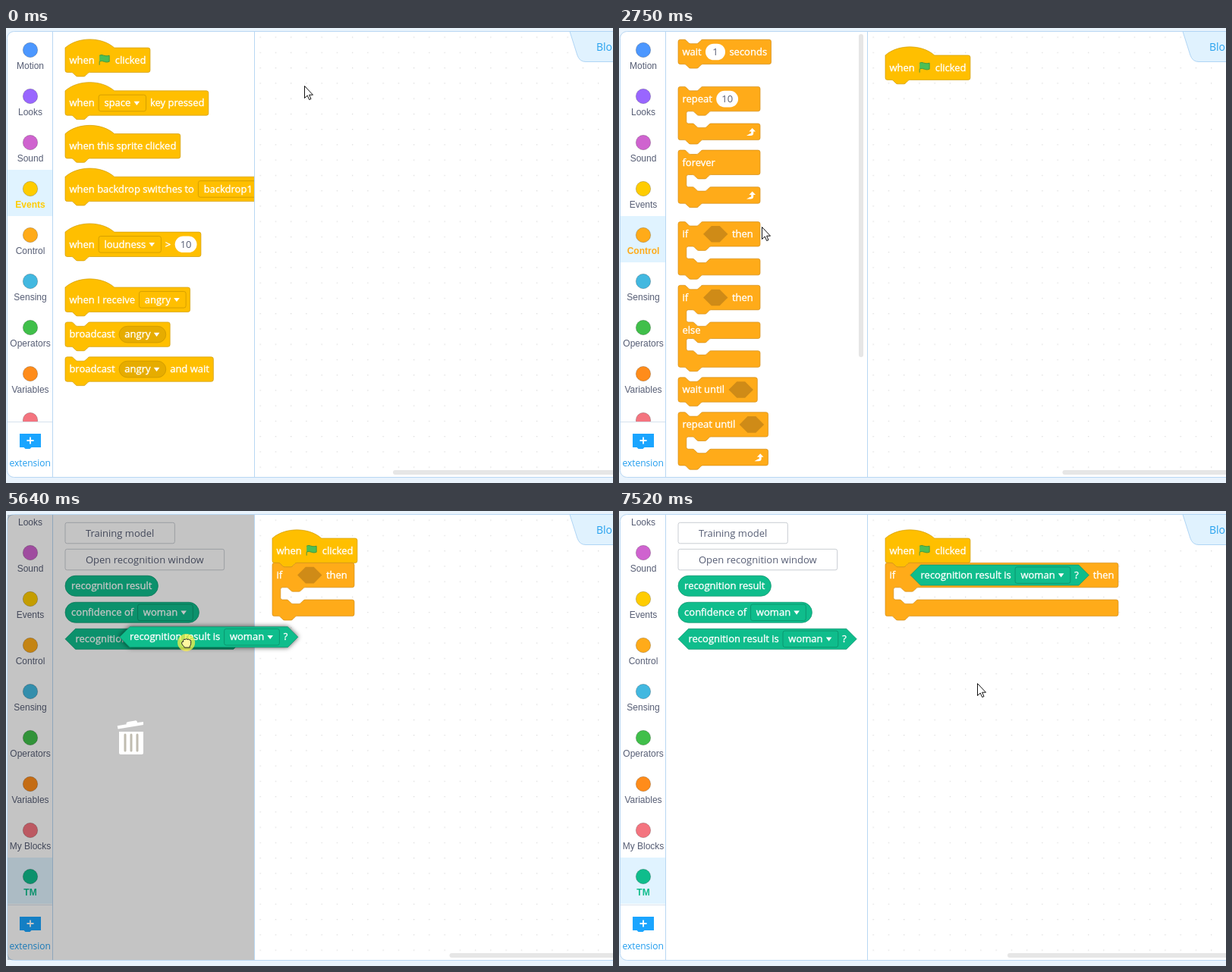
These frames come from a looping animation (800x600 px, 7.9 s). An HTML page:

```html
<!DOCTYPE html>
<html lang="en">
<head>
<meta charset="utf-8">
<title>Block editor</title>
<style>
  html, body { margin: 0; width: 100%; height: 100%; overflow: hidden; background: #e9f3fc; }
  svg { display: block; width: 100%; height: 100%; }
  text { font: 13px "Open Sans", "Noto Sans", sans-serif; white-space: pre; }
  .cap { fill: #fff; stroke: #fff; stroke-width: .35; }
  .ink { fill: #575e75; text-anchor: middle; }
  .cat { font: 12px "Liberation Sans", Arial, sans-serif; }
  .on { font-weight: bold; }
  .drag { filter: drop-shadow(0 0 3px rgba(0, 0, 0, .65)); }
</style>
</head>
<body>
<svg id="stage" viewBox="0 0 800 600"></svg>
<script>
const LOOP = 7900;
const SCALE = .675; // block units to pixels
const px = units => units * SCALE;
const GAP = px(8);

const events = { fill: '#ffbf00', line: '#cc9900', dark: '#e6ac00' };
const control = { fill: '#ffab19', line: '#cf8b17', dark: '#cf8b17' };
const tm = { fill: '#0fbd8c', line: '#0b8e69', dark: '#0da57a' };

// ---- block outlines, in block units ----
const notch = 'c2,0 3,1 4,2 l4,4 c1,1 2,2 4,2 h12 c2,0 3,-1 4,-2 l4,-4 c1,-1 2,-2 4,-2';
const notchBack = 'c-2,0 -3,1 -4,2 l-4,4 c-1,1 -2,2 -4,2 h-12 c-2,0 -3,-1 -4,-2 l-4,-4 c-1,-1 -2,-2 -4,-2';
const shoulder = w => `H${w - 4} a4,4 0 0 1 4,4`;
const topEdge = w => `M0,4 A4,4 0 0 1 4,0 H12 ${notch} ${shoulder(w)}`;
const bottomEdge = h => `V${h - 4} a4,4 0 0 1 -4,4 H48 ${notchBack} H4 a4,4 0 0 1 -4,-4 z`;
const mouth = (y, w) => `V${y - 4} a4,4 0 0 1 -4,4 H64 ${notchBack} h-8 a4,4 0 0 0 -4,4 v16
  a4,4 0 0 0 4,4 h8 ${notch} ${shoulder(w)}`;
const hexagon = w => `M20,0 H${w - 20} l20,20 -20,20 H20 L0,20 z`;

const stackRow = { pad: GAP, mid: px(24), height: 48, head: 0, min: 0 };
const loop = { ...stackRow, height: 104, min: 160, path: w => topEdge(w) + mouth(48, w) + bottomEdge(104) };
const reporter = { mid: px(20), height: 40, head: 0, min: 0 };
const kinds = {
  hat: { ...stackRow, head: px(16), path: w => `M0,0 c25,-22 71,-22 96,0 ${shoulder(w)} ${bottomEdge(48)}` },
  stack: { ...stackRow, path: w => topEdge(w) + bottomEdge(48) },
  loop,
  cycle: { ...loop, decor: w => `<path transform="translate(${w - 12} 60)" fill="#fff"
    d="M-6,4.5 h5 c3,0 4.2,-1 4.2,-3.5 v-2 h2.8 l-4.3,-4.5 -4.3,4.5 h2.8 v1.6 c0,1 -.5,1.3 -1.6,1.3 z"/>` },
  fork: { ...loop, height: 160, path: w => topEdge(w) + mouth(48, w) + mouth(104, w) + bottomEdge(160),
    decor: () => label('else').draw(GAP, px(88)) },
  pill: { ...reporter, pad: px(12), path: w => `M20,0 H${w - 20} a20,20 0 0 1 0,40 H20 a20,20 0 0 1 0,-40 z` },
  hex: { ...reporter, pad: px(20), path: hexagon }
};

// ---- parts of a block: a width and a way to draw at x around a middle line ----
const ruler = document.createElement('canvas').getContext('2d');
ruler.font = '13px "Open Sans", "Noto Sans", sans-serif';
const textWidth = s => ruler.measureText(s).width;
const box = (x, mid, w, r, paint) =>
  `<rect x="${x}" y="${mid - px(16)}" width="${w}" height="${px(32)}" rx="${r}" ${paint}/>`;
const ink = (x, y, s) => `<text class="ink" x="${x}" y="${y}">${s}</text>`;

const label = s => ({
  w: textWidth(s),
  draw: (x, mid) => `<text class="cap" x="${x}" y="${mid + 4.3}">${s}</text>`
});
const menu = (s, round) => {
  const w = textWidth(s) + 27.5;
  return { w, draw: (x, mid, color) =>
    box(x, mid, w, px(round ? 16 : 4), `fill="${round ? color.dark : color.fill}" stroke="${color.line}" stroke-width=".8"`) +
    label(s).draw(x + 7.3, mid) + `<path d="M${x + w - 16},${mid - 2.3} h7.6 l-3.8,5.2 z" fill="#fff"/>` };
};
const number = s => {
  const w = Math.max(26, textWidth(s) + 14);
  return { w, draw: (x, mid) => box(x, mid, w, px(16), 'fill="#fff"') + ink(x + w / 2, mid + 4.3, s) };
};
const hole = { w: px(48), pointed: true, draw: (x, mid, color) =>
  `<path transform="translate(${x} ${mid - px(16)}) scale(${SCALE * .8})" d="${hexagon(60)}" fill="${color.dark}"/>` };
const flag = { w: px(24), draw: (x, mid) => `<path transform="translate(${x} ${mid})"
  d="M1,-6 c4,-2.5 6,2 13,0 v8 c-6,2.5 -8,-2.5 -13,0 v4.5" fill="#4cbf56" stroke="#45993d" stroke-linejoin="round"/>` };

// Lays its parts out in a row; can itself be a part of another block.
function block(kindName, color, ...parts) {
  const kind = kinds[kindName];
  let x = kind.pad, row = '';
  for (const part of parts) {
    if (part.pointed) x = Math.max(x, px(49)); // keeps clear of the notch
    row += part.draw(x, kind.mid, color);
    x += part.w + GAP;
  }
  const w = Math.max(px(kind.min), x - GAP + kind.pad);
  const at = (left, top) => `<g transform="translate(${left} ${top})">
    <path transform="scale(${SCALE})" d="${kind.path(w / SCALE)}" fill="${color.fill}" stroke="${color.line}"/>
    ${row}${kind.decor ? kind.decor(w) : ''}</g>`;
  return { w, at, head: kind.head, height: px(kind.height), pointed: kindName === 'hex',
    draw: (left, mid) => at(left, mid - kind.mid) };
}
const button = s => {
  const w = textWidth(s) + 54;
  return { head: 0, height: 27, at: (x, y) =>
    `<rect x="${x}" y="${y}" width="${w}" height="27.5" rx="2.5" fill="#fff" stroke="#c9cdd3"/>` + ink(x + w / 2, y + 18.5, s) };
};

const whenFlag = block('hat', events, label('when'), flag, label('clicked'));
const ifThen = block('loop', control, label('if'), hole, label('then'));
const resultIs = block('hex', tm, label('recognition result is'), menu('woman'), label('?'));
const ifResult = block('loop', control, label('if'), resultIs, label('then'));

// ---- palettes: blocks from top to bottom, numbers are extra space ----
const palettes = {
  Events: { gap: px(20), items: [
    whenFlag,
    block('hat', events, label('when'), menu('space'), label('key pressed')),
    block('hat', events, label('when this sprite clicked')),
    block('hat', events, label('when backdrop switches to'), menu('backdrop1')), px(24),
    block('hat', events, label('when'), menu('loudness'), label('>'), number('10')), px(24),
    block('hat', events, label('when I receive'), menu('angry')),
    block('stack', events, label('broadcast'), menu('angry', true)),
    block('stack', events, label('broadcast'), menu('angry', true), label('and wait'))
  ] },
  Control: { gap: px(20), items: [
    block('stack', control, label('wait'), number('1'), label('seconds')), px(24),
    block('cycle', control, label('repeat'), number('10')),
    block('cycle', control, label('forever')), px(16),
    ifThen,
    block('fork', control, label('if'), hole, label('then')),
    block('stack', control, label('wait until'), hole),
    block('cycle', control, label('repeat until'), hole)
  ] },
  TM: { gap: 8, items: [
    button('Training model'),
    button('Open recognition window'),
    block('pill', tm, label('recognition result')),
    block('pill', tm, label('confidence of'), menu('woman')),
    resultIs
  ] }
};

function column({ gap, items }) {
  let y = 15.3;
  return items.map(item => {
    if (typeof item === 'number') { y += item; return ''; }
    item.home = [78, y + item.head];
    y += item.head + item.height + gap;
    return item.at(...item.home);
  }).join('');
}

const categories = {
  Motion: '#4c97ff', Looks: '#9966ff', Sound: '#cf63cf', Events: '#ffcc00', Control: '#ffab19',
  Sensing: '#42b8e0', Operators: '#40bf4a', Variables: '#ff8c1a', 'My Blocks': '#f4747f', TM: '#0fbd8c'
};
const categoryList = chosen => Object.entries(categories).map(([name, color], i) => {
  const y = 5 + 61 * i, on = name === chosen;
  return (on ? `<rect x="2" y="${y - 1}" width="59" height="61" fill="#e0f3ff"/>` : '') +
    `<circle cx="32" cy="${y + 24}" r="9.7" fill="${color}"/>
    <circle cx="32" cy="${y + 24}" r="9.7" fill="none" stroke="#000" stroke-opacity=".2"/>
    <text class="ink cat${on ? ' on' : ''}" x="32" y="${y + 49}"${on ? ` style="fill:${color}"` : ''}>${name}</text>`;
}).join('');

const toolbox = Object.entries(palettes).map(([name, palette]) => `<g id="${name}">
  <g clip-path="url(#listClip)"><g transform="translate(0 ${name === 'TM' ? -96 : 0})">${categoryList(name)}</g></g>
  <g clip-path="url(#flyoutClip)">${column(palette)}</g></g>`).join('');

document.getElementById('stage').innerHTML = `
<defs>
  <pattern id="dots" x="334.5" y="11.5" width="20.25" height="20.25" patternUnits="userSpaceOnUse">
    <rect width="1.3" height="1.3" fill="#dcdcdc"/></pattern>
  <clipPath id="listClip"><rect x="2" y="5" width="59" height="514"/></clipPath>
  <clipPath id="flyoutClip"><rect x="62" y="5" width="265" height="587"/></clipPath>
</defs>
<rect width="800" height="600" fill="#e9f3fc"/>
<rect x="1.5" y="4.5" width="820" height="588" rx="9" fill="#fff" stroke="#b8d7f3"/>
<rect x="328" y="5" width="472" height="587" fill="url(#dots)"/>
<path d="M743,4.5 L753,36 Q756,44.5 764,44.5 H801 V4.5 z" fill="#e0f2fe" stroke="#b0d5f5"/>
<text x="778" y="30" fill="#27a2ee" style="font-size:14px">Blo</text>
<rect id="bar" y="583" width="400" height="6" rx="3" fill="#e6e6e6"/>
<g id="placedHat">${whenFlag.at(351, 36)}</g>
<g id="placedIf">${ifThen.at(351, 68.4)}</g>
<g id="placedFull">${ifResult.at(351, 68.4)}</g>
${toolbox}
<rect id="flyoutBar" x="316" y="8" width="6" height="426" rx="3" fill="#e6e6e6"/>
<path d="M61.5,5 V592 M327.5,5 V592" stroke="#b8d7f3"/>
<path d="M2,519.5 H61" stroke="#d6e2ee"/>
<path d="M18,535 h28 v18 h-12.5 l-2,2 h-6 l-2,-2 h-5.500 z" fill="#1aa5ff"/>
<path d="M27.5,544 h9 M32,539.5 v9" stroke="#fff" stroke-width="1.8"/>
<text class="ink" x="31.7" y="578" style="font-size:12px;fill:#1f9cee">extension</text>
<g id="dim">
  <rect x="2" y="5" width="325" height="587" opacity=".23"/>
  <path d="M149,291 h32 v28 q0,2 -2,2 h-28 q-2,0 -2,-2 z" fill="#fff"/>
  <path d="M157,295 v21 M165,295 v21 M173,295 v21" stroke="#c0bcb0" stroke-width="3" stroke-linecap="round"/>
  <path d="M147.5,287.5 L181,282 v-4 l-8,1 q0,-3 -3,-2.6 l-9,1.5 q-3,.5 -2.3,3.3 l-12,2 z" fill="#fff"/>
</g>
<g id="dragHat" class="drag">${whenFlag.at(0, 0)}</g>
<g id="dragIf" class="drag">${ifThen.at(0, 0)}</g>
<g id="dragResult" class="drag">${resultIs.at(0, 0)}</g>
<g id="cursor">
  <path id="arrow" d="M.5,.5 V16.5 L4.2,13 L6.7,18.5 L9,17.5 L6.6,12.2 H11.5 z" fill="#fff" stroke="#111"/>
  <g id="hand" transform="translate(7 8)">
    <circle r="11.5" cy="-.5" fill="#fbf04a" opacity=".75"/>
    <path d="M-6,0 q0,-2 2,-1.5 v-2 q.5,-2 2.5,-1 q1.5,-1.8 3,0 q1.8,-1.2 2.6,.6 q2,-.6 2,1.5 v3 q0,2 -1.5,4 v1.5
      h-7 q-.3,-1.5 -2,-2.8 q-1.6,-1.5 -1.6,-3.3 z" fill="#fff7a0" stroke="#222"/>
  </g>
</g>`;

// ---- pointer moves: where the tip ends, and the block carried along, if any ----
const FRAME = 90;
const dragHat = { id: 'dragHat', home: whenFlag.home };
const dragIf = { id: 'dragIf', home: ifThen.home };
const dragResult = { id: 'dragResult', home: resultIs.home };
const moves = [
  { from: 0, to: 0, tip: [393, 76] },
  { from: 80, to: 340, tip: [152, 37] },
  { from: 550, to: 1300, tip: [407, 40], held: dragHat, drop: [333, 29.3], power: 3.2 },
  { from: 1400, to: 1490, tip: [425, 47], held: dragHat, drop: [351, 36] },
  { from: 1680, to: 1870, tip: [384, 128] },
  { from: 2200, to: 2750, tip: [188, 262] },
  { from: 2850, to: 2940, tip: [157, 258] },
  { from: 3040, to: 3410, tip: [392, 160], held: dragIf, drop: [271, 182] },
  { from: 3670, to: 3880, tip: [425, 65], held: dragIf, drop: [346, 62] },
  { from: 4170, to: 4450, tip: [425, 169] },
  { from: 4800, to: 4800, tip: [409, 172] },
  { from: 4990, to: 5080, tip: [159, 169] },
  { from: 5320, to: 6110, tip: [442, 157], held: dragResult, drop: [361, 145], power: 1.5 },
  { from: 6190, to: 6850, tip: [462, 82], held: dragResult, drop: [381, 68] },
  { from: 7130, to: 7520, tip: [472, 227] }
];
moves.forEach((move, i) => {
  const before = moves[i - 1] || move;
  move.tipStart = before.tip;
  if (move.held) move.lift = before.held ? before.drop : move.held.home;
});

function progress({ from, to, power = 1 }, t) {
  const gaps = Math.round((to - from) / FRAME);
  const step = gaps ? Math.min(gaps, Math.floor((t + 9 - from) / (to - from) * gaps)) : 0;
  return ((step + 1) / (gaps + 1)) ** power;
}
const mix = (a, b, k) => a.map((v, i) => v + (b[i] - v) * k);

const el = id => document.getElementById(id);
const show = (id, on) => { el(id).style.display = on ? '' : 'none'; };
const place = (id, [x, y]) => el(id).setAttribute('transform', `translate(${x} ${y})`);

const HAT_PLACED = 1680, TO_CONTROL = 2040, IF_PLACED = 4170, TO_TM = 4630, RESULT_PLACED = 7130;

function render(t) {
  const move = moves.filter(m => m.from <= t).pop();
  const k = progress(move, t);
  const tip = mix(move.tipStart, move.tip, k);
  const held = move.held;

  show('Events', t < TO_CONTROL);
  for (const id of ['Control', 'flyoutBar']) show(id, t >= TO_CONTROL && t < TO_TM);
  show('TM', t >= TO_TM);
  show('placedHat', t >= HAT_PLACED);
  show('placedIf', t >= IF_PLACED && t < RESULT_PLACED);
  show('placedFull', t >= RESULT_PLACED);
  el('bar').setAttribute('x', t < HAT_PLACED ? 510 : t < RESULT_PLACED ? 584.5 : 512);

  show('dim', held && tip[0] < 320);
  for (const drag of [dragHat, dragIf, dragResult]) show(drag.id, drag === held);
  if (held) place(held.id, mix(move.lift, move.drop, k));
  show('arrow', !held);
  show('hand', held);
  show('cursor', t < TO_TM || move.from > TO_TM);
  place('cursor', tip);
}

function tick() {
  render(performance.now() % LOOP);
  requestAnimationFrame(tick);
}
tick();
</script>
</body>
</html>
```
